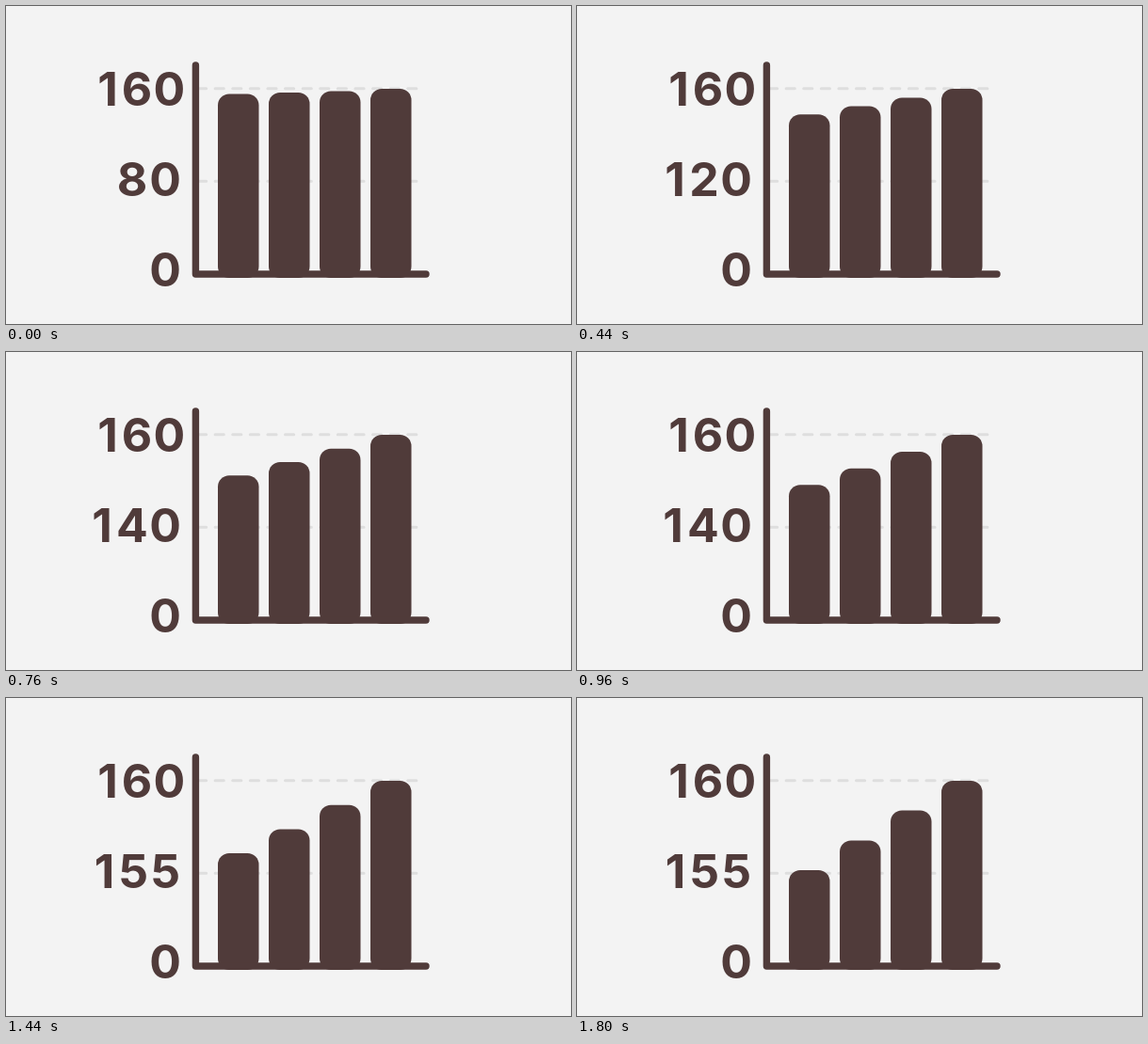
Animation of 600x338 px, one loop 2 s. Source, as an HTML page:

```html
<!DOCTYPE html>
<html lang="en">
<head>
<meta charset="utf-8">
<title>Bar chart with a shifting scale</title>
<style>
  html, body { margin: 0; width: 100%; height: 100%; overflow: hidden; background: #f3f3f3; }
  svg { display: block; width: 100%; height: 100%; }

  .grid { stroke: #dedede; stroke-width: 3; stroke-linecap: round; stroke-dasharray: 9.2 9.4; }
  .axis { fill: none; stroke: #503b3a; stroke-width: 7.4; stroke-linecap: round; stroke-linejoin: round; }

  text { font: 700 50px Inter, "Liberation Sans", sans-serif; fill: #503b3a; text-anchor: middle; }

  /* Bars shrink in 40 ms steps, then rest for 200 ms. */
  .bar {
    fill: #503b3a; width: 43.5px; rx: 12px;
    animation: shrink 2s infinite;
  }
  @keyframes shrink {
    0% {
      y: var(--from); height: calc(289px - var(--from));
      animation-timing-function: steps(45, end);
    }
    90%, 100% { y: var(--to); height: calc(289px - var(--to)); }
  }

  /* Each middle label holds for 360 ms; the last one stays to the end. */
  .mid {
    opacity: 0;
    animation: show 2s step-end infinite;
    animation-delay: calc(var(--i) * 360ms - 2s);
  }
  .last { animation-name: showLast; }
  @keyframes show { 0% { opacity: 1; } 18%, 100% { opacity: 0; } }
  @keyframes showLast { 0% { opacity: 1; } 28%, 100% { opacity: 0; } }
</style>
</head>
<body>
<svg viewBox="0 0 600 338">
  <path class="grid" d="M203.5 87.8H437M203.5 186.3H437"/>

  <rect class="bar" x="225" style="--from:93.4px; --to:183px"/>
  <rect class="bar" x="279" style="--from:92px; --to:151.4px"/>
  <rect class="bar" x="333" style="--from:90.4px; --to:119.6px"/>
  <rect class="bar" x="387" style="--from:88px; --to:88px"/>

  <path class="axis" d="M201.4 63V285H446"/>

  <text x="108 139 173.3" y="105.5">160</text>
  <text x="169" y="298">0</text>

  <text class="mid" style="--i:0" x="134 169" y="202">80</text>
  <text class="mid" style="--i:1" x="104 135 169" y="202">120</text>
  <text class="mid" style="--i:2" x="102 134 169" y="202">140</text>
  <text class="mid" style="--i:3" x="104.5 135.5 169" y="202">150</text>
  <text class="mid last" style="--i:4" x="104.5 135.5 169.5" y="202">155</text>
</svg>
</body>
</html>
```
